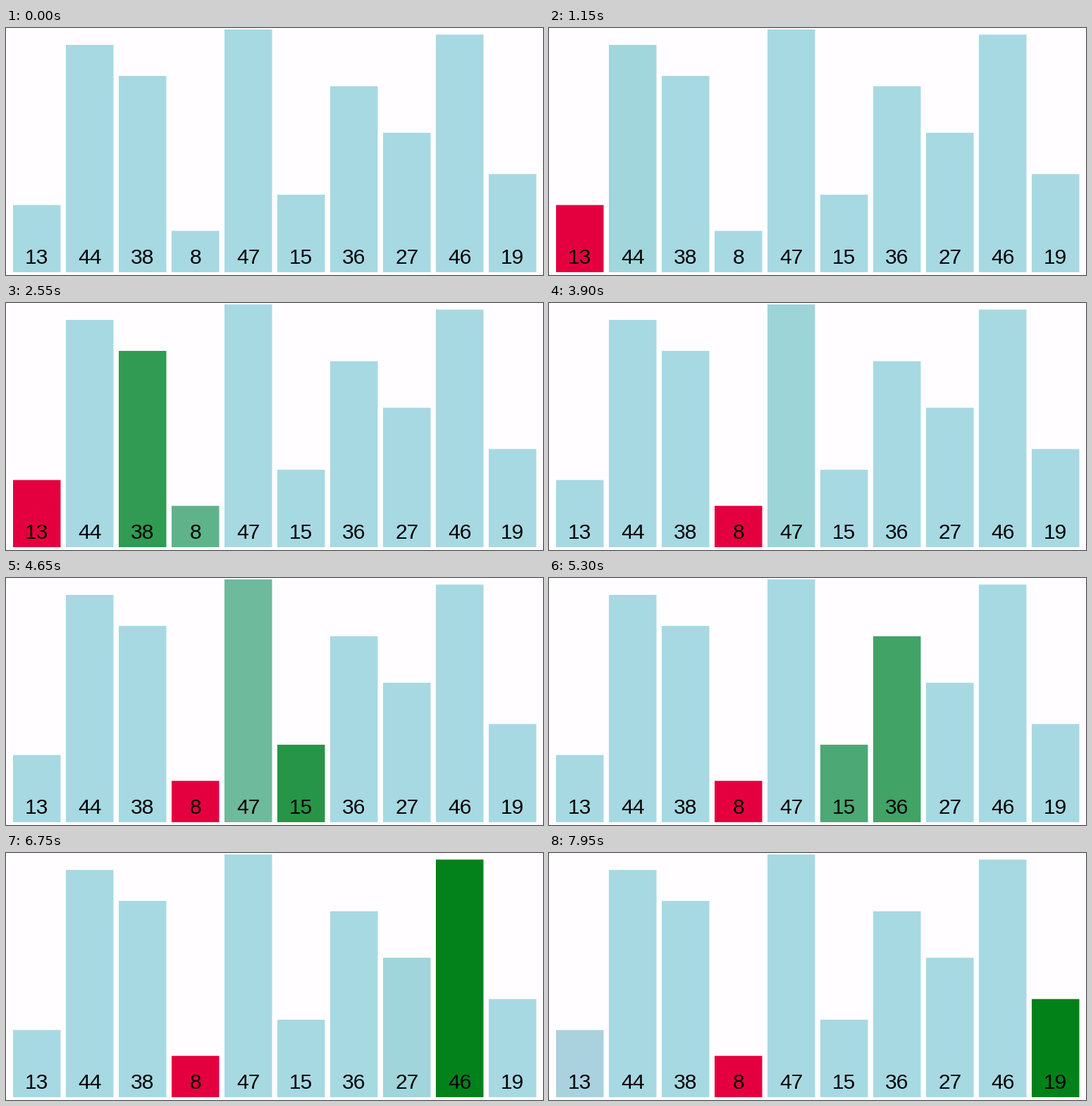
A matplotlib script for the animation above (8000 ms loop, 762 px wide and 351 px high).

```python
import numpy as np
import matplotlib.pyplot as plt
from matplotlib.animation import FuncAnimation
from matplotlib.patches import Rectangle

W, H, DPI = 762, 351, 96
STEP, LOOP = 50, 8000
FADE, LAG = 250, 14  # fade length and delay of the fade-out, ms

VALUES = [13, 44, 38, 8, 47, 15, 36, 27, 46, 19]
PITCH, LEFT, BAR_W, BASE = 75, 10, 67.5, 347
UNIT = 345 / max(VALUES)

LIGHT = np.array([167, 217, 227]) / 255
GREEN = np.array([0, 128, 23]) / 255
RED = np.array([228, 0, 62]) / 255

# (start ms, bar, colour): the search for the smallest value
EVENTS = [(425, 0, RED)]


def scan(bars, starts):
    """Green cursor moves along the bars, clearing the one before."""
    for k, (bar, start) in enumerate(zip(bars, starts)):
        EVENTS.append((start, bar, GREEN))
        if k:
            EVENTS.append((start + LAG, bar - 1, LIGHT))


scan(range(1, 4), [1101, 1776, 2431])
EVENTS += [(3160, 3, RED), (3160 + LAG, 0, LIGHT)]
scan(range(4, 10), [3838, 4497, 5165, 5865, 6540, 7210])
EVENTS += [(7900, 0, RED), (7900 + LAG, 9, LIGHT)]


def ease(t):
    t = min(max(t, 0), 1)
    return 4 * t**3 if t < 0.5 else 1 - 4 * (1 - t) ** 3


def bar_color(bar, ms):
    color = LIGHT
    for start, target, goal in EVENTS:
        if target == bar:
            color = color + (goal - color) * ease((ms - start) / FADE)
    return color


plt.rcParams["font.family"] = "Liberation Sans"
fig = plt.figure(figsize=(W / DPI, H / DPI), dpi=DPI, facecolor="#fffdff")
ax = fig.add_axes([0, 0, 1, 1])
ax.set(xlim=(0, W), ylim=(H, 0))
ax.axis("off")

bars = []
for i, value in enumerate(VALUES):
    x, h = LEFT + i * PITCH, value * UNIT
    rect = Rectangle((x, BASE - h), BAR_W, h, lw=0, fc=LIGHT, snap=False)
    bars.append(ax.add_patch(rect))
    ax.text(x + BAR_W / 2, 335, str(value), size=30 * 72 / DPI,
            color="black", ha="center", va="baseline")


def draw(frame):
    for i, rect in enumerate(bars):
        rect.set_facecolor(bar_color(i, frame * STEP))
    return bars


anim = FuncAnimation(fig, draw, frames=LOOP // STEP, interval=STEP,
                     repeat=True, repeat_delay=0, blit=False)
plt.show()
```
